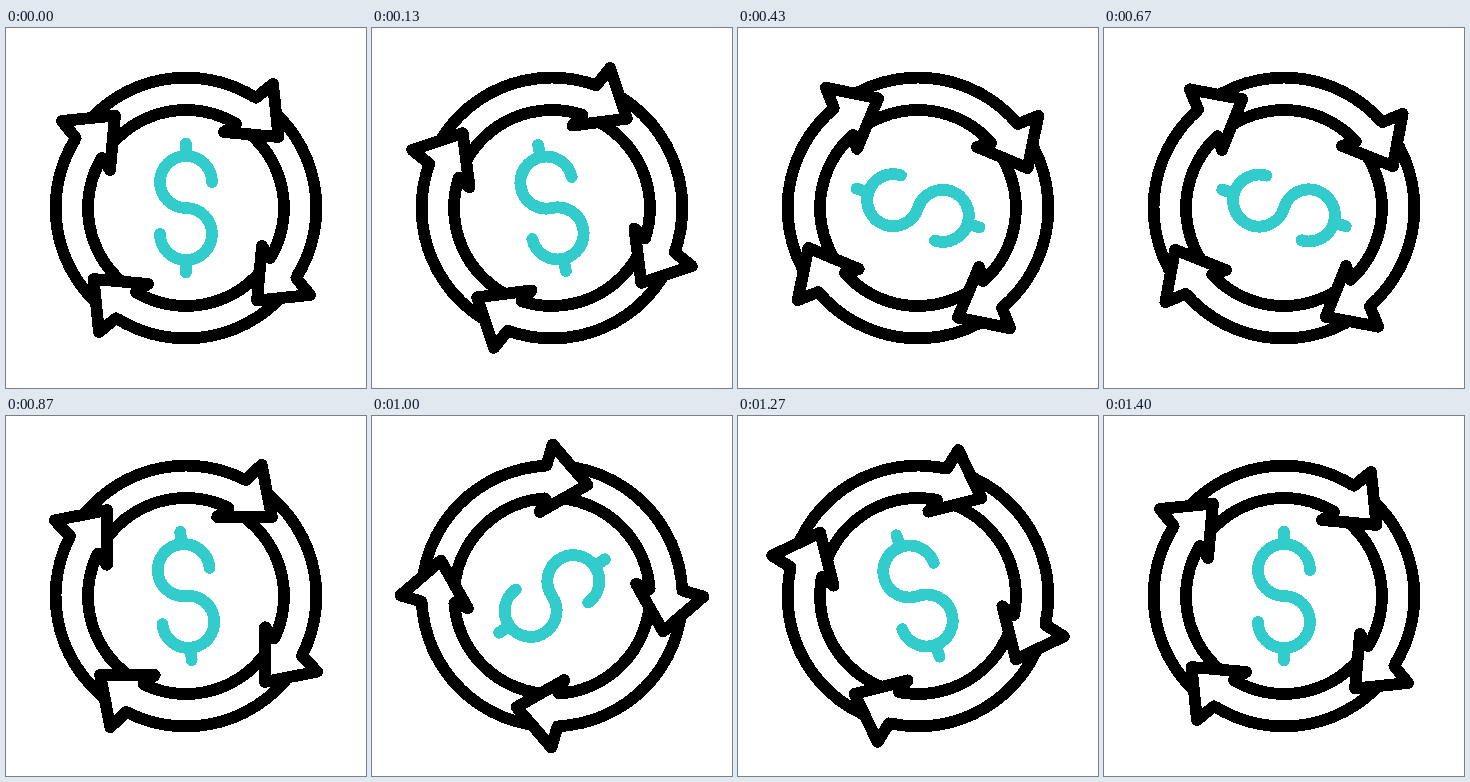
An HTML page that plays this animation: 360 by 360 pixels, repeating every 2000 ms.

```html
<!DOCTYPE html>
<html lang="en">
<head>
<meta charset="utf-8">
<title>Money cycle</title>
<style>
  html, body { margin: 0; height: 100%; overflow: hidden; background: #fff; }
  svg { display: block; width: 100%; height: 100%; shape-rendering: crispEdges; }
  .line { fill: none; stroke: #000; stroke-width: 11.8; stroke-linecap: round; stroke-linejoin: round; }
  .head { fill: #fff; }
  .dollar { stroke: #33cccc; }
</style>
</head>
<body>
<svg viewBox="-180 -180 360 360">
  <g id="wheel">
    <circle class="line" r="130.4"/>
    <circle class="line" r="98"/>
    <path id="head" class="line head" d="M70-110.3 87-124 92.5-71 38-76 50-84"/>
    <use href="#head" transform="rotate(90)"/>
    <use href="#head" transform="rotate(180)"/>
    <use href="#head" transform="rotate(270)"/>
    <path class="line dollar" d="M26-26A26 26 0 1 0 0 0A26 26 0 1 1-26 26M0-64.4V-52M0 52V64.4"/>
  </g>
</svg>
<script>
  const LOOP = 2000, STEP = 1000 / 30;
  const BACK = 17, END = 42;      // steps: end of wind-up, end of swing
  const WIND = -85, TURN = 180;   // degrees
  const wheel = document.getElementById('wheel');
  const start = performance.now();

  // cubic-bezier(.31, 0, .69, 1), solved by bisection
  function ease(x) {
    let lo = 0, hi = 1, t = 0.5;
    for (let i = 0; i < 30; i++) {
      t = (lo + hi) / 2;
      const u = 1 - t;
      const bx = 3 * 0.31 * t * u * u + 3 * 0.69 * t * t * u + t * t * t;
      if (bx < x) lo = t; else hi = t;
    }
    return t * t * (3 - 2 * t);
  }

  function angle(step) {
    if (step >= END) return TURN;
    if (step <= BACK) return WIND * ease(step / BACK);
    return WIND + (TURN - WIND) * ease((step - BACK) / (END - BACK));
  }

  // The wheel moves in 30 hard steps per second
  function draw() {
    const time = (performance.now() - start) % LOOP;
    const step = Math.floor((time + 3.4) / STEP) % 60;
    wheel.setAttribute('transform', `rotate(${angle(step).toFixed(3)})`);
    requestAnimationFrame(draw);
  }
  draw();
</script>
</body>
</html>
```
